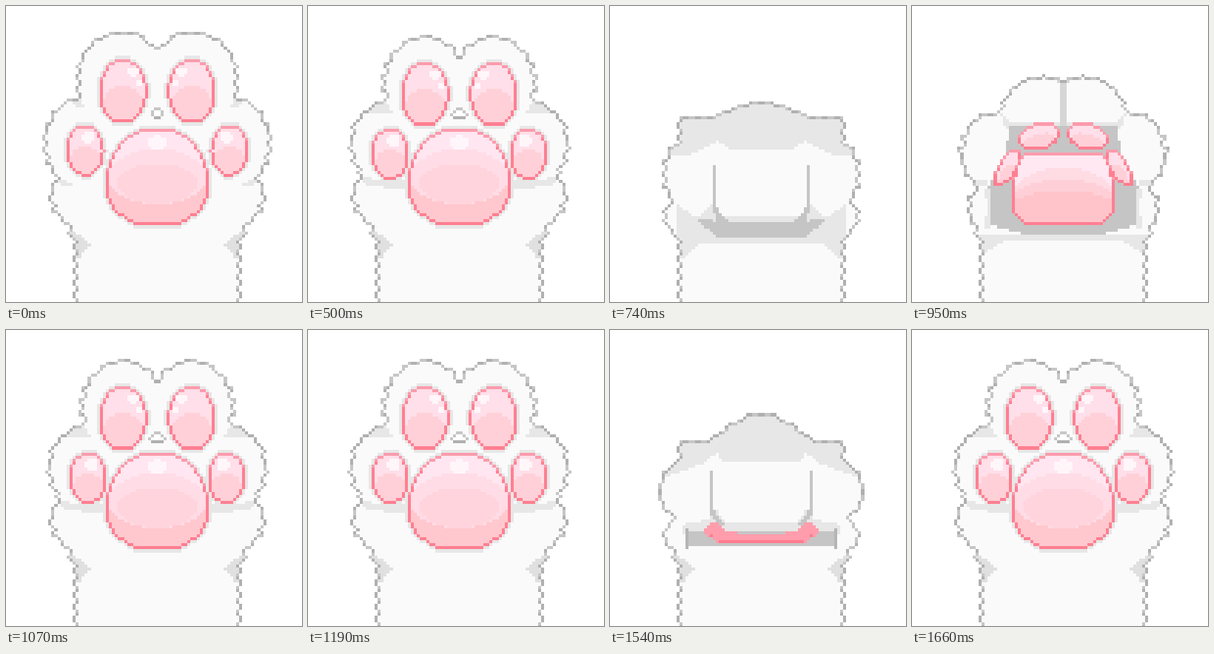
These frames come from a looping animation (400x400 px, 1720 ms). An HTML page with a canvas:

```html
<!DOCTYPE html>
<html lang="en">
<head>
<meta charset="utf-8">
<title>Cat paw</title>
<style>
html, body { margin: 0; height: 100%; overflow: hidden; background: #fff; }
canvas { display: block; width: 100vw; height: 100vh; }
</style>
</head>
<body>
<canvas id="stage" width="400" height="400"></canvas>
<script>
const CELL = 4.09, TOP = 2, HALF = 50, ROWS = 98, AXIS = HALF * CELL;
const WHITE = '#fafafa', LIGHT = '#e7e7e7', MID = '#d6d6d6', DARK = '#c5c5c5', SHINE = '#fff6fa';
const stage = document.getElementById('stage').getContext('2d');
let ctx;

function oval(x, y, rx, ry, tilt = 0) {
  const a = tilt * Math.PI / 180, dx = rx * Math.cos(a), dy = rx * Math.sin(a);
  const arc = `a${rx},${ry} ${tilt} 1 0 `;
  return `M${x - dx},${y - dy}${arc}${2 * dx},${2 * dy}${arc}${-2 * dx},${-2 * dy}Z`;
}

// Cell test for a path on the left half; the right half is its mirror.
function tester(d, tuft = 0) {
  const path = new Path2D(d);
  return (i, j) => {
    if (i >= HALF) i = 2 * HALF - 1 - i;
    const x = (i + .5) * CELL + (j % 4 < 2 ? 0 : tuft);
    return stage.isPointInPath(path, x, TOP + (j + .5) * CELL);
  };
}

function cell(i, j, color) {
  ctx.fillStyle = color;
  const y = Math.round(TOP + j * CELL), h = Math.round(TOP + (j + 1) * CELL) - y;
  for (const k of [i, 2 * HALF - 1 - i]) {
    const x = Math.round(k * CELL);
    ctx.fillRect(x, y, Math.round((k + 1) * CELL) - x, h);
  }
}

// Fills a path, outlines it one cell wide and lays clipped colour bands inside.
function shape(d, fill, edge, bands, { tuft, halo } = {}) {
  const inside = tester(d, tuft);
  const layers = bands.map(([path, color]) => [tester(path), color]).reverse();
  for (let j = 0; j < ROWS; j++) for (let i = 0; i < HALF; i++) {
    const near = [[i, j - 1], [i - 1, j], [i + 1, j], [i, j + 1]];
    if (inside(i, j)) {
      const open = near.findIndex(n => !inside(...n));
      const band = layers.find(([test]) => test(i, j));
      cell(i, j, open >= 0 ? edge(i, j, open) : band ? band[1] : fill);
    } else if (halo && near.some(n => inside(...n))) cell(i, j, halo);
  }
}

const ARM = 'M95,150V420H230V150Z' + oval(130, 300, 43, 40);
const WRIST = ['M84,298L114,321 97,345 88,325Z', '#e0e0e0'];

const body = (d, bands) => shape(d, WHITE,
  (i, j) => (i + j) % 4 < 2 ? '#b0b0b0' : '#c6c6c6', bands, { tuft: 4 });

const pad = (d, fill, bands, halo) => shape(d, fill,
  (i, j, open) => open ? '#ff7f91' : '#fb9bac', bands, { halo });

function toePad([x, y, rx, ry, tilt = 0], shines, halo) {
  pad(oval(x, y, rx, ry, tilt), '#ffdfe9', [
    [oval(x, y + ry * .43, rx * .82, ry * .57, tilt), '#ffd0d8'],
    ...shines.map(([u, v, r]) => [oval(x + u * rx, y + v * ry, r, r * .9), SHINE])], halo);
}

function fingers({ lobe, toe, thumb, top, side }, bands, halo) {
  body(oval(...lobe) + oval(...toe) + oval(...thumb) + ARM, bands);
  toePad(side, halo ? [[.15, -.5, 9]] : [], halo);
  toePad(top, halo ? [[.42, -.6, 7], [.67, -.28, 5]] : [], halo);
}

function openHand(parts, fold, crease) {
  fingers(parts, [[fold, LIGHT], [oval(...parts.lobe), WHITE], [crease, LIGHT], WRIST], LIGHT);
  pad('M230,166H190C160,168 134,205 134,240C134,270 155,290 180,297H230Z', '#ffc8ce', [
    [oval(AXIS, 200, 72, 62), '#ffe6f0'],
    [oval(AXIS, 231, 66, 37), '#ffdce6'],
    [oval(AXIS, 240, 53, 27), '#ffd4dc'],
    [oval(AXIS, 185, 12, 10), SHINE]], LIGHT);
}

const spread = {
  lobe: [158, 101, 61, 68], toe: [105, 185, 52, 62], thumb: [100, 258, 38, 42],
  top: [158, 115, 33, 44], side: [107, 195, 26, 35]
};
const relaxed = {
  lobe: [160, 104, 57, 64], toe: [108, 187, 49, 58], thumb: [100, 258, 38, 42],
  top: [158, 119, 33, 44, 0], side: [111, 199.5, 26, 35, 0]
};
const curled = {
  lobe: [182, 150, 63, 56], toe: [110, 198, 43, 54], thumb: [104, 273, 28, 33],
  top: [172, 176, 29, 19, -18], side: [129, 218, 13, 29, 32]
};
const halfway = {};
for (const part in relaxed) halfway[part] = relaxed[part].map((v, k) => (v + curled[part][k]) / 2);

const CREASE = 'M70,232L136,236 140,246 80,245Z';

const poses = {
  A() { openHand(spread, 'M84,120H114V141L96,137Z', 'M68,232L92,242 74,243Z'); },
  B() { openHand(relaxed, 'M56,120H114V145H66Z', CREASE); },
  C() { openHand(halfway, 'M56,130H118V155H66Z', CREASE); },
  D() {
    fingers(curled, [
      ['M118,140L132,157H205V166H126Z', LIGHT],
      ['M72,232L104,236V244H82Z', LIGHT],
      ['M88,308H230V316H125L90,340Z', LIGHT],
      ['M130,162H230V308H150L104,295V243L128,195Z', DARK],
      ['M186,92H230V162H200V108Z', MID],
      ['M96,248H106V300H96L104,272Z', LIGHT]]);
    pad('M230,197H165C140,197 135,235 135,245V280L152,297H230Z', '#ffe8f1',
      ['#ffdbe4', '#ffcfd7', '#ffc4ca'].map((color, k) => [oval(AXIS, 275, 76, 57 - 16 * k), color]));
  },
  E() {
    body('M230,112H204C175,112 150,140 125,157S72,183 68,210S78,245 86,256H230Z'
      + oval(104, 278, 30, 26) + ARM, [
      ['M60,205L126,180 145,165 152,178H230V100H60Z', LIGHT],
      ['M100,262L130,256 145,245 155,258H230V274H100Z', LIGHT],
      ['M103,270H230V294H103Z', DARK],
      ['M102,268H106V298H102Z', '#b5b5b5'],
      ['M134,190H138V240L154,262H146L134,246Z', DARK], WRIST]);
    shape('M124,272L142,257 154,270 180,276H230V288H147Z', '#ff9dac',
      (i, j, open) => open === 3 ? '#ff7d8f' : '#ff9dac', []);
  },
  F() {
    body('M230,130H204C170,130 150,145 121,165S74,190 73,222S78,250 86,262H230Z'
      + oval(104, 284, 30, 26) + ARM, [
      ['M60,206L112,200 147,183 162,194H230V120H60Z', LIGHT],
      ['M88,266L118,286 138,266 154,286H230V322H118L97,344 88,310Z', LIGHT],
      ['M138,214H143V260Q145,286 165,290L145,292 138,268Z', DARK],
      ['M112,287L150,292H230V311H145Z', DARK]]);
  }
};

const images = {};
for (const name in poses) {
  const canvas = document.createElement('canvas');
  canvas.width = canvas.height = 400;
  ctx = canvas.getContext('2d');
  ctx.fillStyle = '#fff';
  ctx.fillRect(0, 0, 400, 400);
  poses[name]();
  images[name] = canvas;
}

// Two squeezes: open to fist, back, and again.
const ORDER = 'ABCDEFEDCBABCDEFEDCB', LOOP = 1720;
const HOLD = { 0: 500, 5: 150, 18: 50 };
const start = performance.now();

function render() {
  let t = (performance.now() - start) % LOOP, step = 0;
  while (t >= (HOLD[step] || 60)) t -= HOLD[step++] || 60;
  stage.drawImage(images[ORDER[step]], 0, 0);
  requestAnimationFrame(render);
}
render();
</script>
</body>
</html>
```
